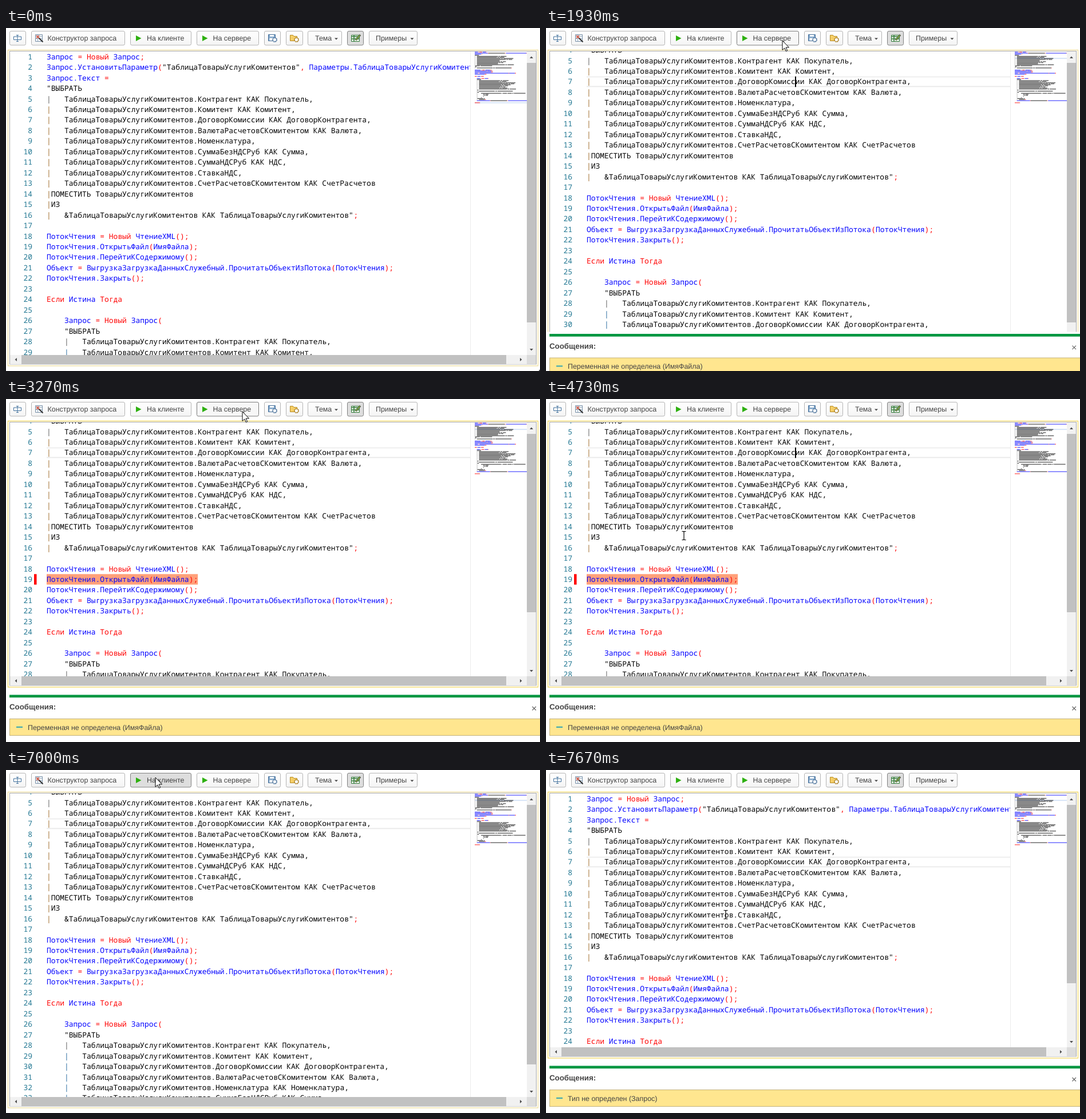
Recreate the animation shown at these times as an HTML page. Size 933 by 600 pixels, loop 8 s.

```html
<!DOCTYPE html>
<html lang="ru">
<head>
<meta charset="utf-8">
<style>
  html, body { margin: 0; width: 100%; height: 100%; overflow: hidden; background: #fff; }
  svg { display: block; width: 933px; height: 600px; }
  text { font: 12.45px "Liberation Sans", Arial, sans-serif; text-rendering: geometricPrecision; }
  #buttons text, #panel text { fill: #444; }
  #code text { font: 12.95px "Noto Sans Mono", "DejaVu Sans Mono", monospace; }
  #buttons rect { fill: url(#face); stroke: #b4b4b4; }
  #buttons rect.on, #buttons rect.down { fill: #dedede; stroke: #808080; }
  #buttons rect.over { fill: #f7f7f7; stroke: #7a7a7a; }
</style>
</head>
<body>
<svg id="stage" viewBox="0 0 933 600">
  <defs>
    <linearGradient id="face" x2="0" y2="1"><stop stop-color="#fff"/><stop offset="1" stop-color="#f4f4f4"/></linearGradient>
    <clipPath id="view"><rect id="viewBox" x="7" y="41" width="804" height="531"/></clipPath>
    <clipPath id="mapView"><rect x="812" y="41" width="98" height="400"/></clipPath>
  </defs>

  <g id="buttons"></g>
  <g id="icons">
    <path d="M13.500 15H26.500V20.500H13.500ZM20 12.500V23.500M18 12.500H22M18 23.500H22" fill="#fff" stroke="#41709c"/>
    <g>
      <path d="M51.500 11.500H63.500V23.500H51.500Z" fill="#f3f6f9" stroke="#7890a8"/>
      <path d="M52 14.500H63M52 18.500H63M55.500 12V23" stroke="#9db3c8"/>
      <path d="M57 17L64.500 24.500" stroke="#333" stroke-width="2"/>
      <path d="M53 13L58 18M58 13L53 18" stroke="#d8482f" stroke-width="1.300"/>
    </g>
    <path d="M227 13L236.500 18L227 23ZM343 13L352.500 18L343 23Z" fill="#2eb010"/>
    <g stroke="#476f98">
      <path d="M458.500 11.500H470.500V22.500H458.500Z" fill="#7fa5c9"/>
      <path d="M461 12H468V15H461ZM460.500 17.500H468V22H460.500Z" fill="#fff" stroke="none"/>
      <circle cx="469.500" cy="20.500" r="3.500" fill="#fff" stroke-width="1.800" stroke-dasharray="2 .7"/>
    </g>
    <g>
      <path d="M496.500 12.500H501.500L503 14.500H508.500V22.500H496.500Z" fill="#f5ce67" stroke="#b88d27"/>
      <circle cx="507.500" cy="20.500" r="3.500" fill="#fff" stroke="#a77c20" stroke-width="1.800" stroke-dasharray="2 .7"/>
    </g>
    <g>
      <path d="M603.500 12.500H617.500V23.500H603.500Z" fill="#e9f4e6" stroke="#347a3c"/>
      <path d="M604 15H617M604 19H617M608 13V23" stroke="#347a3c" stroke-width="1.500"/>
      <path d="M611 21L619 12" stroke="#333" stroke-width="3"/>
      <path d="M611.500 20.500L618.500 12.500" stroke="#8dc63f" stroke-width="1.500"/>
    </g>
    <path d="M574 17.500H580L577 20.500ZM706.500 17.500H712.500L709.500 20.500Z" fill="#444"/>
  </g>

  <rect id="glow" x="3.500" y="38.500" width="926" fill="#fff" stroke-width="1.300"/>
  <rect id="frame" x="6.500" y="40.500" width="920" fill="#fff" stroke="#a9a9a9"/>
  <g clip-path="url(#view)">
    <g id="code">
      <rect id="error" x="71" height="18.400" fill="#ffa07a"/>
      <rect id="mark" x="49" width="4.500" height="18.400" fill="#f00"/>
      <path id="current" d="M71 152.500H811M71 169.300H811" stroke="#e9e9e9" stroke-width="1.700"/>
      <rect id="caret" x="435" y="151.800" width="2" height="18.400" fill="#000"/>
    </g>
  </g>
  <path id="divider" stroke="#ececec"/>
  <g id="map" clip-path="url(#mapView)"><rect id="mapLine" x="819" width="91" height="1.800" fill="#d5e3f7"/></g>
  <rect id="track" x="910" y="41" width="16" fill="#f1f1f1"/>
  <rect id="thumb" x="910" y="61" width="16" fill="#c1c1c1"/>
  <path d="M915 53H921L918 49.500Z" fill="#505050"/>
  <g id="bottom">
    <rect x="7" y="572" width="903" height="16" fill="#f1f1f1"/>
    <rect x="27" y="572" width="847" height="16" fill="#c1c1c1"/>
    <rect x="910" y="572" width="16" height="16" fill="#dcdcdc"/>
    <path d="M19 577V583L15.500 580ZM898 577V583L901.500 580ZM915 561H921L918 564.500Z" fill="#505050"/>
  </g>

  <g id="panel">
    <rect y="514" width="933" height="90" fill="#fff"/>
    <rect x="6" y="517.500" width="927" height="4.700" fill="#009640"/>
    <text x="6" y="543" style="font-weight:bold;font-size:13.300px">Сообщения:</text>
    <path d="M919.500 538L926 544.500M926 538L919.500 544.500" stroke="#666" stroke-width="1.200"/>
    <rect x="6.500" y="559.500" width="930" height="29" fill="#ffe68f" stroke="#c4b27a"/>
    <rect x="18" y="573" width="11" height="1.800" fill="#219fb5"/>
    <text id="message" x="38" y="578.500"></text>
  </g>

  <path id="arrow" d="M0 0V16.500L3.800 13L6.300 18.700L8.700 17.600L6.200 12H11.500Z" fill="#fff" stroke="#000" stroke-linejoin="round"/>
  <path id="beam" d="M-3.500 -7.500H-1L0 -6.500L1 -7.500H3.500M0 -6.500V6.500M-3.500 7.500H-1L0 6.500L1 7.500H3.500" fill="none" stroke="#000" stroke-width="1.200"/>
</svg>

<script>
const $ = id => document.getElementById(id);
const set = (node, attrs) => { for (const k in attrs) node.setAttribute(k, attrs[k]); return node; };
const add = (parent, tag, attrs, text = '') => {
  const node = set(document.createElementNS('http://www.w3.org/2000/svg', tag), attrs);
  node.textContent = text;
  return parent.appendChild(node);
};
const show = (id, on) => $(id).setAttribute('visibility', on ? 'visible' : 'hidden');

// Toolbar: left, right, label, label x
const buttons = [
  [6, 34], [44, 207, 'Конструктор запроса', 72.5], [217, 323, 'На клиенте', 246],
  [333, 441, 'На сервере', 361.5], [451, 479], [489, 518], [527, 586, 'Тема', 540],
  [596, 624], [634, 718, 'Примеры', 646]
].map(([left, right, label, x]) => {
  const box = add($('buttons'), 'rect', { x: left + .5, y: 5.5, width: right - left, height: 24.5, rx: 2.5 });
  if (label) add($('buttons'), 'text', { x, y: 22.3 }, label);
  return { left, right, box };
});
const [CLIENT, SERVER, TOGGLE] = [2, 3, 7];

// Code
const table = 'ТаблицаТоварыУслугиКомитентов';
const field = name => `|   ${table}.${name}`;
const head = ['Контрагент КАК Покупатель,', 'Комитент КАК Комитент,',
  'ДоговорКомиссии КАК ДоговорКонтрагента,', 'ВалютаРасчетовСКомитентом КАК Валюта,'].map(field);
const from = `|   &${table} КАК ${table}`;
const setParam = `Запрос.УстановитьПараметр("${table}", Параметры.${table});`;
const indent = line => '    ' + line;
const lines = [
  'Запрос = Новый Запрос;', setParam, 'Запрос.Текст =', '"ВЫБРАТЬ', ...head,
  ...['Номенклатура,', 'СуммаБезНДСРуб КАК Сумма,', 'СуммаНДСРуб КАК НДС,', 'СтавкаНДС,',
    'СчетРасчетовСКомитентом КАК СчетРасчетов'].map(field),
  '|ПОМЕСТИТЬ ТоварыУслугиКомитентов', '|ИЗ', from + '";', '',
  'ПотокЧтения = Новый ЧтениеXML();', 'ПотокЧтения.ОткрытьФайл(ИмяФайла);',
  'ПотокЧтения.ПерейтиКСодержимому();',
  'Объект = ВыгрузкаЗагрузкаДанныхСлужебный.ПрочитатьОбъектИзПотока(ПотокЧтения);',
  'ПотокЧтения.Закрыть();', '', 'Если Истина Тогда', '',
  ...['Запрос = Новый Запрос(', '"ВЫБРАТЬ', ...head,
    ...['Номенклатура КАК Номенклатура,', 'СуммаБезНДСРуб КАК Сумма,', 'СуммаНДСРуб КАК НДС,',
      'СтавкаНДС КАК СтавкаНДС,', 'СчетРасчетовСКомитентом КАК СчетРасчетов'].map(field),
    '|ИЗ', from, '|ГДЕ',
    `|       ${table}.Комитент В (ВЫБРАТЬ Комитент ИЗ ТоварыУслугиКомитентов`,
    '|           ГДЕ Истина', '|           И НЕ Ложь', '|           )', '|       )',
    '|УПОРЯДОЧИТЬ ПО', '|   Покупатель");', setParam].map(indent),
  '', 'КонецЕсли;'
];
const LINE = 18.46, CHAR = 7.77, TOP = 41;
const MAP_LINE = LINE / 10, MAP_CHAR = .923;
const token = /"[^"]*"?|\||(?<=\|)[^"]+"?|[\p{L}\w.]+|\S/gu;
const keyword = /^(Новый|Если|Тогда|КонецЕсли)$/;

lines.forEach((line, i) => {
  const y = TOP + i * LINE + 13.7;
  add($('code'), 'text', { x: 46, y, 'text-anchor': 'end', fill: '#237893' }, i + 1);
  for (const m of line.matchAll(token)) {
    const text = m[0].trimStart(), col = m.index + m[0].length - text.length;
    let fill = /^[\p{L}\w]/u.test(text) && !keyword.test(text) ? '#00f' : '#f00';
    if (text[0] === '"' || line[m.index - 1] === '|') fill = '#000';
    if (text === '|') fill = i === 4 || i === 27 ? '#555' : i < 20 ? '#9b651f' : '#1f659b';
    add($('code'), 'text', { x: 71 + col * CHAR, y, fill }, text);
    for (const w of text.matchAll(/\S+/g))
      add($('map'), 'rect', {
        x: 819 + (col + w.index) * MAP_CHAR, y: TOP + .6 + i * MAP_LINE,
        width: w[0].length * MAP_CHAR, height: 1.15, fill: text === '|' ? '#777' : fill, opacity: .75
      });
  }
});

// Pointer stops: time, x, y
const path = [
  [0, 932, 598], [730, 437, 161], [980, 437, 161], [1470, 413, 22], [4440, 413, 22],
  [4730, 241, 239], [4960, 190, 566], [5270, 832, 570], [5730, 919, 538], [5870, 919, 538],
  [6670, 261, 13], [7200, 261, 13], [7670, 314, 253], [8000, 314, 253]
];
function pointer(t) {
  const i = path.findIndex(p => p[0] > t), [t0, x0, y0] = path[i - 1], [t1, x1, y1] = path[i];
  const k = (1 - Math.cos(Math.PI * (t - t0) / (t1 - t0))) / 2;
  return [x0 + (x1 - x0) * k, y0 + (y1 - y0) * k];
}
const within = (t, a, b) => t >= a && t < b;
const even = (t, period) => Math.floor(t / period) % 2 === 0;

function draw(t) {
  const [mx, my] = pointer(t);
  const first = t < 5870;
  const slideStart = first ? 1770 : 7130;
  const slide = first || t >= 7130 ? Math.min(1, Math.max(0, (t - slideStart) / 200)) : 0;
  const open = slide === 1;
  const bottom = open ? 485 : 572;

  // Editor layout
  set($('glow'), { height: bottom - 19.5, stroke: open ? '#f3d964' : '#efdf9f' });
  set($('frame'), { height: bottom - 24.5 });
  set($('viewBox'), { height: bottom - TOP });
  set($('divider'), { d: `M811.5 41V${bottom}` });
  set($('track'), { height: bottom - TOP });
  set($('thumb'), { height: open ? 312 : 454 });
  set($('bottom'), { transform: `translate(0 ${bottom - 572})` });
  set($('code'), { transform: `translate(0 ${within(t, 1730, 7130) ? -67 : 0})` });

  // Caret, current line and error line
  const clicked = t >= 930;
  show('current', clicked);
  set($('mapLine'), { y: TOP + .2 + MAP_LINE * (clicked ? 6 : lines.length - 1) });
  show('caret', within(t, 930, 6870) && (t < 1430 || even(t - 1730, 500)));
  const row = first ? 18 : 0;
  const error = first ? t >= 2070 && even(t - 2070, 300) : within(t, 7370, 7670);
  show('error', error);
  show('mark', error);
  set($('error'), { y: TOP + row * LINE, width: lines[row].length * CHAR });
  set($('mark'), { y: TOP + row * LINE });

  // Messages
  show('panel', slide > 0);
  set($('panel'), { transform: `translate(0 ${90 * (1 - slide)})` });
  $('message').textContent = first ? 'Переменная не определена (ИмяФайла)' : 'Тип не определен (Запрос)';

  // Buttons and pointer
  const down = within(t, 1670, 1730) ? SERVER : within(t, 6870, 7130) ? CLIENT : -1;
  buttons.forEach(({ left, right, box }, i) => {
    const over = my > 5 && my < 30 && mx >= left && mx <= right;
    set(box, { class: i === TOGGLE ? 'on' : i === down ? 'down' : over ? 'over' : '' });
  });
  const beam = mx > 71 && mx < 811 && my > TOP && my < bottom;
  show('beam', beam);
  show('arrow', !beam);
  set($(beam ? 'beam' : 'arrow'), { transform: `translate(${Math.round(mx)} ${Math.round(my)})` });
}

const start = performance.now();
function tick(now) {
  draw(Math.max(0, now - start) % 8000);
  requestAnimationFrame(tick);
}
draw(0);
requestAnimationFrame(tick);
</script>
</body>
</html>
```
